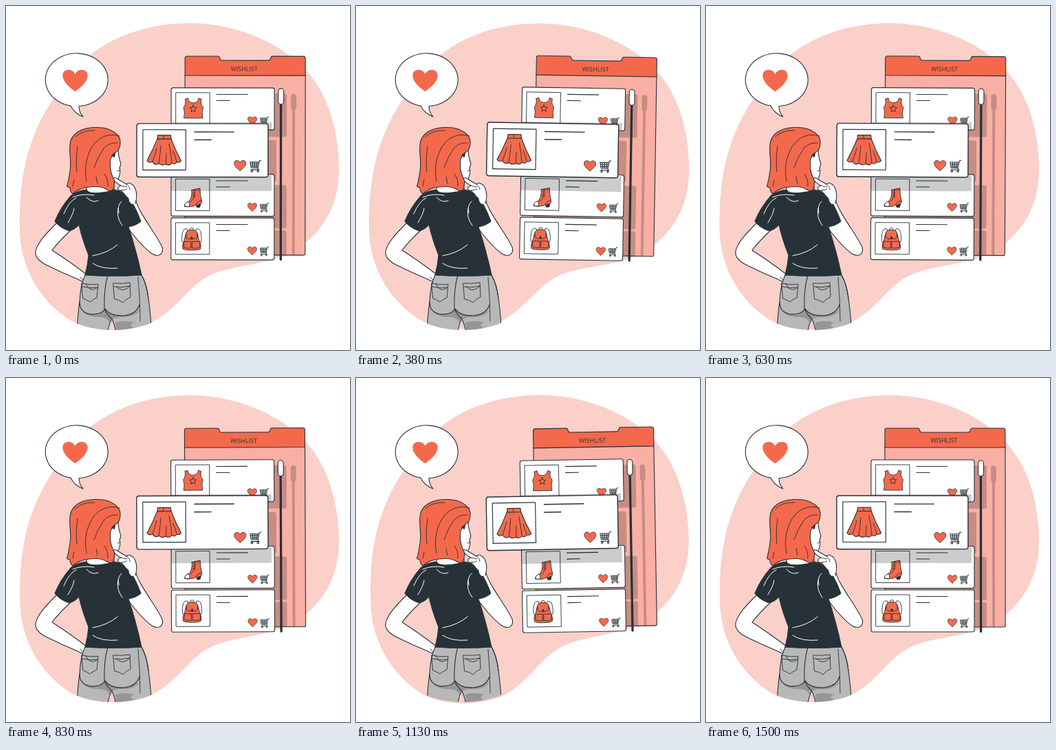
Write an HTML page that moves like this. It is 500 px wide and 500 px high and loops after 1.54 s.

```html
<!DOCTYPE html>
<html lang="en">
<head>
<meta charset="utf-8">
<title>Wishlist</title>
<style>
html, body { margin: 0; width: 100%; height: 100%; overflow: hidden; background: #fff; }
svg { display: block; width: 100vw; height: 100vh; }
.ink { stroke: #263238; stroke-width: 1.1; stroke-linecap: round; stroke-linejoin: round; }
.ink path, .ink rect, .ink circle { vector-effect: non-scaling-stroke; }
.thin { stroke-width: .9; }
.w { fill: #fff; }
.o { fill: #f4694c; }
.d { fill: #263238; }
.n { fill: none; }
.shade { fill: #000; fill-opacity: .2; stroke: none; }
.light { fill: none; stroke: #fff; stroke-width: 1; }
.ink .bar { stroke-width: 4; vector-effect: none; }
#title { font-stretch: 62.5%; fill: #263238; text-anchor: middle; }
</style>
</head>
<body>
<svg viewBox="0 0 500 500">
  <defs>
    <path id="blob" d="M20 322C19 250 30 180 86 112C118 60 185 25 268 25C330 25 400 51 440 98C470 133 484 185 484 238C484 290 460 330 420 355C385 375 345 375 310 386C265 400 255 440 208 462C170 476 125 473 95 458C50 430 20 380 20 322Z"/>
    <path id="heart" d="M0 7.500C-5 4-9 0-9-4C-9-9-2-9.500 0-5C2-9.500 9-9 9-4C9 0 5 4 0 7.500Z"/>
    <g id="cart" fill="none">
      <path d="M6.500-6.200L4.600-5.800L2.800 2.800L4 4.500H-5M4.200-4.200H-6L-4.800 2.400H2.900M-5.700-2H3.700M-5.200.3H3.300M-3.300-4.200L-2.700 2.400M-.7-4.200V2.400M1.900-4.200L1.300 2.400"/>
      <circle cx="-4" cy="6" r="1"/><circle cx="3" cy="6" r="1"/>
    </g>
    <g id="card">
      <rect class="w" width="150" height="61" rx="2.600"/>
      <rect class="w thin" x="7" y="7" width="49" height="46"/>
      <path class="bar" d="M66 9.500H111M66 18.500H85"/>
      <use href="#heart" class="o thin" transform="translate(118 48) scale(.74)"/>
      <use href="#cart" class="thin" x="135.500" y="48"/>
    </g>
    <clipPath id="cut"><use href="#blob"/></clipPath>
    <clipPath id="inside"><rect x="260" y="101" width="175" height="261"/></clipPath>
  </defs>

  <use id="back" href="#blob" fill="#fad0c9"/>

  <g id="list">
    <g class="ink">
      <path fill="#f9afa3" d="M260 100H435V360Q435 362 433 362H262Q260 362 260 360Z"/>
      <g clip-path="url(#inside)">
        <rect class="shade" x="258" y="127" width="150" height="63" rx="3"/>
        <rect class="shade" x="208" y="195" width="185" height="60" rx="3"/>
        <rect class="shade" x="258" y="260" width="150" height="63" rx="3"/>
        <rect class="shade" x="258" y="326" width="150" height="50" rx="3"/>
        <path class="shade" d="M414 131.500A4 4 0 0 1 422 131.500V147Q422 150 420 151V362H416V151Q414 150 414 147Z"/>
      </g>
      <path class="o" d="M260 101V76Q260 73 263 73H308Q310 73 310.500 75.500Q311 79 314 79H381Q384 79 384.500 75.500Q385 73 387 73H432Q435 73 435 76V101Z"/>
    </g>
    <text id="title" x="346" y="94.500">WISHLIST</text>

    <g class="ink">
      <use href="#card" x="240" y="119"/>
      <use href="#card" x="240" y="244.500"/>
      <use href="#card" x="240" y="308"/>

      <!-- top -->
      <g class="thin">
        <path class="o" d="M260.500 135.500L264.500 134Q265 141 272 141Q279 141 280 134L284 135.500Q282 143 286.500 147.500Q284 155 286 163H258.500Q260.500 155 258 147.500Q262 143 260.500 135.500Z"/>
        <path class="n" id="star"/>
      </g>

      <!-- boot -->
      <g class="thin">
        <path class="o" d="M270 267.500L282 265Q282 275 284.500 283Q285 287 282.500 288L281.500 292.500H277.500L276.500 289Q271 293 259.500 291.500Q259 286.500 265 284.500Q271 280 270 267.500Z"/>
        <path class="w" d="M259.500 290.500Q259 286.500 265 284.500Q267.500 287 266.500 291.500Q262 292 259.500 290.500Z"/>
        <path class="n" d="M274 267V277Q272 282 267.500 285M272 271H275M271.500 274H275M271 277H275M276 289Q278 284 284 283"/>
        <path class="d" d="M277.500 290L283 287.500L281.700 292.500H278Z"/>
      </g>

      <!-- backpack -->
      <g class="thin">
        <path class="w" d="M263 324Q257 322 256 334Q255 342 258 345L261 342Q259 332 264 328ZM277 324Q283 322 284 334Q285 342 282 345L279 342Q281 332 276 328Z"/>
        <path class="o" d="M262 331Q263 326 270 326Q277 326 278 331L282 344Q284 347 283 353Q281 355 270 355Q259 355 257 353Q256 347 258 344Z"/>
        <path class="n" d="M267 326Q267 322.500 270 322.500Q273 322.500 273 326"/>
        <path class="o" d="M262 329Q264 325.500 270 325.500Q276 325.500 278 329V336Q277 339 270 339Q263 339 262 336Z"/>
        <path class="o" d="M259 342.500H269V352Q263 353 259 351ZM271 342.500H282V351Q277 353 271 352Z"/>
        <circle class="d" cx="270" cy="337" r="1.300"/>
      </g>

      <path class="shade" d="M240 169H386V180H240ZM240 246H386V269H240Z"/>
      <use href="#card" transform="translate(190 171) scale(1.273)"/>

      <!-- skirt -->
      <path class="o" d="M220 193Q213 210 205 225Q208 229 213 226.500Q217 233 222 229Q227 233 232 230Q238 233 241 228.500Q246 231 248 227Q253 228 254.500 225Q246 209 240 193Z"/>
      <path class="o" d="M220.500 188H239.500L240 193.500H220Z"/>
      <path class="n thin" d="M219 207Q217 217 213 226M225 203Q224 217 222 229M233 214L232.500 229M237 200Q240 214 241 228M243 211Q246 219 248 226M229 188V193"/>

      <path class="n" d="M399.500 130V368.500" style="stroke-width:3.300"/>
      <rect class="w" x="395.700" y="119.800" width="7.800" height="23" rx="3.900"/>
    </g>
  </g>

  <g class="ink">
    <!-- bubble -->
    <path class="w" d="M106 145.720A45.500 38.500 0 1 0 94 145.100Q99 156 112 161Q106 154 106 145.720Z"/>
    <use href="#heart" transform="translate(100.500 109) scale(2.020)" fill="#f4694c" stroke="none"/>

    <!-- left arm -->
    <path class="w" d="M74 315C60 329 45 344 43 357C42 367 53 374 62 378Q82 388 104 397L114 402L118 391Q95 373 67 355Q76 343 94 326Z"/>
    <path class="n thin" d="M108 394Q110 398 114 399"/>

    <!-- jeans -->
    <g clip-path="url(#cut)">
      <path fill="#b8b8b8" d="M115 391H197Q205 405 207 425Q210 445 212 480H161Q158 463 154 455Q149 462 147 480H103Q104 450 107 430Q108 406 115 391Z"/>
      <path fill="#969696" stroke="none" d="M107 437Q116 450 135 448L145 441Q155 451 176 450L195 442Q185 454 164 452L154 455L150 460Q147 452 135 452Q114 453 107 437ZM159 460Q172 456 187 460Q176 464 187 468Q172 471 160 471Z"/>
      <path class="n" d="M148 391Q142 412 143 440Q146 448 154 455M107 430Q107 445 122 448Q139 449 144 440Q151 451 171 450Q190 448 194 434M197 391Q204 403 207 425"/>
      <path class="n thin" d="M110 403Q122 406 134 404.500L132 424Q127 426 122 430Q117 427 112 425ZM111 408Q122 411 133 409M116 404Q122 417 132 410M156 403Q169 404 180 402L181 423Q174 426 170 431Q165 427 158 426ZM157 408Q169 410 180 407M160 408Q170 418 180 407M192 394Q195 428 195 458"/>
    </g>

    <!-- neck and face -->
    <path class="w" d="M117 255V272Q138 282 158 271L156 257Q163 254 164 249Q167 241 165 235Q168 230 166 226Q163 218 163 207H145Z"/>
    <path class="n thin" d="M162 240L165 239"/>

    <!-- right arm -->
    <path class="w" d="M188 279C190 298 221 334 227.500 352C228.500 362 221 365 212 360C199 351 185 333 176 321L195 312Q187 301 181 287Z"/>

    <!-- shirt -->
    <path class="d" d="M117 267Q120 274 140 271Q151 270 157 267Q172 270 179 278Q190 296 196 313Q189 319 178 321Q189 354 197 391Q156 394 115 391Q119 376 120 362Q111 340 106 318Q100 325 92 327Q79 323 71 313Q79 293 94 276Q104 268 117 267Z"/>
    <path class="light" d="M97 278Q110 272 128 275M84 302Q92 283 102 279M90 315Q98 302 99 294M117 278Q125 287 134 283M163 294Q160 307 169 319M168 284Q161 290 164 301M126 363Q148 359 162 347M126 374Q139 383 162 381"/>

    <!-- hand -->
    <path class="w" d="M188 287Q191 277 189 269Q187 260 181 258Q178 256 175 259Q168 255 160 250Q156 249 156 252Q159 257 167 261Q161 263 163 267Q165 269 168 268Q168 271 171 272Q174 276 178 280Q178 285 182 288"/>
    <path class="n thin" d="M167 261Q172 263 176 263M168 268Q173 268 176 266M175 259Q180 262 180 267"/>

    <!-- hair -->
    <path class="o" d="M133 176.500C116 176 99 181 94 196C90 211 96 225 93 240Q91 254 88.500 262Q90 264 93 264Q93 270 97 273Q107 264 122 263Q138 261 147 267Q155 272 157 262Q159 254 155 248Q150 238 152 222Q155 217 159 213Q165 210 166 201C168 188 155 177 133 176.500Z"/>
    <path class="n thin" d="M165 189Q150 184 136 193Q122 203 117 225Q114 240 117 255M162 199Q150 198 142 207Q133 220 128 235M101 190Q111 180 129 181M104 204Q101 225 103 241M99 253L97 262M131 248L133 258M143 244Q149 252 148 262"/>
    <path class="d thin" d="M154 217L158 213Q159 217 157 220Q156 217 154 217Z"/>
  </g>
</svg>
<script>
const LOOP = 1540, LEAD = 30, TILT = 1;
const el = id => document.getElementById(id);

// five-pointed star on the top
el('star').setAttribute('d', 'M' + Array.from({ length: 10 }, (_, i) => {
  const r = i % 2 ? 2.4 : 5.4, a = i * Math.PI / 5;
  return (272 + r * Math.sin(a)).toFixed(2) + ' ' + (149.5 - r * Math.cos(a)).toFixed(2);
}).join('L') + 'Z');

// set the header in the narrowest face, as large as its place allows
function fitTitle(room, largest) {
  const title = el('title');
  const width = face => {
    title.setAttribute('font-family', `'${face}', sans-serif`);
    title.setAttribute('font-size', 20);
    return title.getComputedTextLength() / 20;
  };
  const faces = ['Roboto', 'Open Sans', 'Noto Sans', 'Lato', 'Noto Sans CJK SC', 'Liberation Sans'];
  const best = faces.reduce((a, b) => width(b) < width(a) ? b : a);
  title.setAttribute('font-size', Math.min(largest, room / width(best)));
}

// 0 → 1 at a quarter, → -1 at three quarters, → 0
function swing(p) {
  if (p < .25) return p * 4;
  return p < .75 ? 2 - p * 4 : p * 4 - 4;
}

function turn(id, deg, x, y) {
  el(id).setAttribute('transform', `rotate(${deg.toFixed(4)} ${x} ${y})`);
}

function draw(t) {
  const deg = TILT * swing(((t + LEAD) % LOOP) / LOOP);
  turn('back', deg, 252, 248);
  turn('list', deg, 312.5, 221.5);
}

let start;
function tick(now) {
  start ??= now;
  draw(now - start);
  requestAnimationFrame(tick);
}
fitTitle(39, 13.5);
draw(0);
requestAnimationFrame(tick);
</script>
</body>
</html>
```
